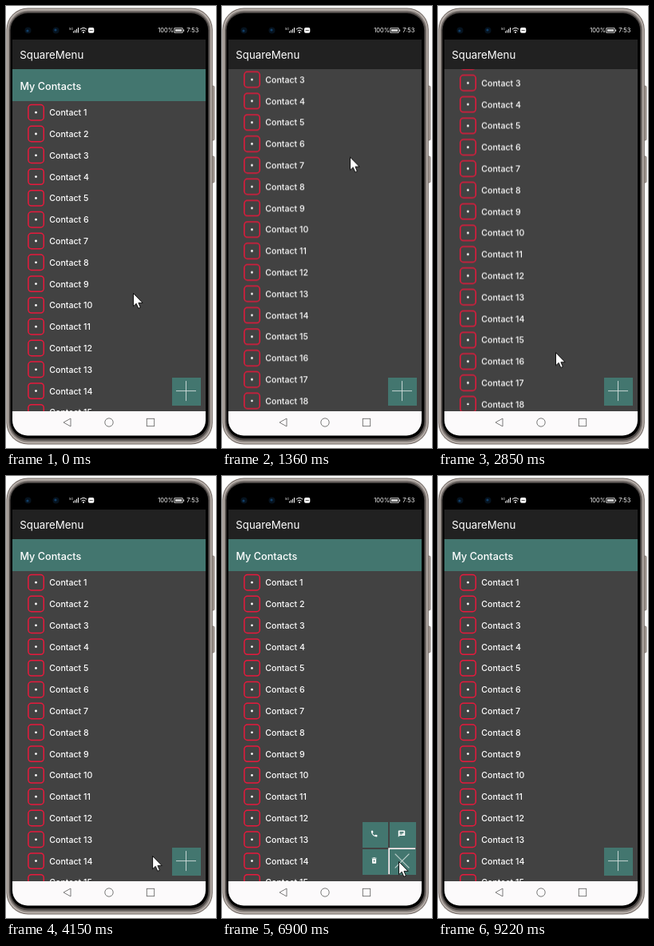
Animation of 263 by 553 pixels, one loop 9870 ms. Source, as an HTML page:

```html
<!DOCTYPE html>
<html lang="en">
<head>
<meta charset="utf-8">
<title>SquareMenu</title>
<style>
  html, body { margin: 0; width: 100%; height: 100%; overflow: hidden; background: #fdfdfd; }
  svg { display: block; width: 263px; height: 553px; }
  text { font-family: Inter, "Open Sans", sans-serif; fill: #fff; }
  .title { font-size: 13.3px; }
  .header { font-size: 12.7px; font-weight: 500; }
  .row text { font-size: 10.6px; font-weight: 500; }
  .row rect { fill: none; stroke: #e8193c; stroke-width: 1.5; }
  .status text { font-size: 7.4px; }
  .nav { fill: none; stroke: #6c6c6c; stroke-width: .9; }

  .cursor, .list, .tile, .plus, .icons { animation: 9870ms linear infinite; }
  .cursor { animation-name: cursor; }
  .list { animation-name: scroll; }
  .icons { animation-name: icons; animation-timing-function: step-end; }
  .plus { animation-name: spin; transform-origin: 225.5px 481.6px; }
  .tile { fill: #43766f; }
  .tl { animation-name: tl; }
  .tr { animation-name: tr; }
  .bl { animation-name: bl; }
  .br { animation-name: br; }

  @keyframes cursor {
    0%, 1.2% { transform: translate(159px, 359px); animation-timing-function: ease-in-out; }
    7.9%, 13.8% { transform: translate(160px, 188.6px); }
    17.73%, 22% { transform: translate(161px, 200px); }
    28.87% { transform: translate(147px, 433px); animation-timing-function: ease-out; }
    31.9%, 33.4% { transform: translate(146.5px, 452px); }
    37.8%, 39.4% { transform: translate(147px, 460px); }
    42.05% { transform: translate(183px, 475px); animation-timing-function: ease-out; }
    47.2%, 58.5% { transform: translate(216px, 482px); }
    68.7%, 69.9% { transform: translate(218px, 482px); }
    69.91%, 83.2% { transform: translate(221px, 482px); animation-timing-function: ease-in; }
    89%, 100% { transform: translate(231px, 558px); }
  }
  @keyframes scroll {
    0%, 4.6% { transform: translateY(0); animation-timing-function: ease-in-out; }
    10.74%, 27.9% { transform: translateY(-94.7px); }
    28.87% { transform: translateY(-91px); }
    31.9%, 100% { transform: translateY(0); }
  }
  @keyframes icons {
    0% { opacity: 0; }
    55.319% { opacity: 1; }
    92.2% { opacity: 0; }
    100% { opacity: 0; }
  }
  @keyframes spin {
    0%, 57% { transform: rotate(0); }
    66%, 83.3% { transform: rotate(45deg); }
    92.2%, 100% { transform: rotate(0); }
  }
  @keyframes tl {
    0%, 57% { transform: translate(208px, 465px) scale(18.3); }
    58.36%, 59% { transform: translate(201px, 457px) scale(14, 15.5); animation-timing-function: ease-out; }
    67%, 84% { transform: translate(176px, 433px) scale(32); animation-timing-function: ease-in; }
    91% { transform: translate(201px, 457px) scale(14, 15.5); }
    92.2%, 100% { transform: translate(208px, 465px) scale(18.3); }
  }
  @keyframes tr {
    0%, 57% { transform: translate(226px, 465px) scale(18, 18.3); }
    58.36%, 59% { transform: translate(227px, 457px) scale(16, 15.5); animation-timing-function: ease-out; }
    67%, 84% { transform: translate(210px, 433px) scale(33, 32); animation-timing-function: ease-in; }
    91% { transform: translate(227px, 457px) scale(16, 15.5); }
    92.2%, 100% { transform: translate(226px, 465px) scale(18, 18.3); }
  }
  @keyframes bl {
    0%, 57% { transform: translate(208px, 482px) scale(18.3, 18); }
    58.36%, 59% { transform: translate(201px, 484px) scale(14, 15); animation-timing-function: ease-out; }
    67%, 84% { transform: translate(176px, 467px) scale(32); animation-timing-function: ease-in; }
    91% { transform: translate(201px, 484px) scale(14, 15); }
    92.2%, 100% { transform: translate(208px, 482px) scale(18.3, 18); }
  }
  @keyframes br {
    0%, 57% { transform: translate(226px, 482px) scale(18); }
    58.36%, 59% { transform: translate(227px, 484px) scale(16, 15); animation-timing-function: ease-out; }
    67%, 84% { transform: translate(210px, 467px) scale(33, 32); animation-timing-function: ease-in; }
    91% { transform: translate(227px, 484px) scale(16, 15); }
    92.2%, 100% { transform: translate(226px, 482px) scale(18); }
  }
</style>
</head>
<body>
<svg viewBox="0 0 263 553">
  <defs>
    <clipPath id="view"><rect x="8" y="79" width="242" height="428"/></clipPath>
    <clipPath id="screen"><rect x="8" y="10" width="242" height="527.5" rx="19"/></clipPath>
  </defs>

  <!-- phone body -->
  <g fill="#a59b95" stroke="#6d645f" stroke-width=".7">
    <rect x="256" y="100" width="5" height="68" rx="1.5"/>
    <rect x="256" y="188" width="5" height="33" rx="1.5"/>
  </g>
  <rect x=".5" y="2.5" width="258.3" height="546" rx="27" fill="#6f6661"/>
  <rect x="1.5" y="3.5" width="256.3" height="544" rx="26" fill="#b9b1ac"/>
  <rect x="3" y="5.5" width="253.3" height="540" rx="24.5" fill="#857e7a"/>
  <rect x="4.3" y="7.3" width="250.5" height="536.2" rx="23" fill="#4b4644"/>
  <rect x="5.6" y="9" width="247.6" height="532" rx="21.5" fill="#000"/>

  <!-- screen -->
  <g clip-path="url(#screen)">
    <rect x="8" y="42" width="242" height="37" fill="#212121"/>
    <rect x="8" y="79" width="242" height="428" fill="#424242"/>
    <rect x="8" y="507" width="242" height="32" fill="#fcfafb"/>
  </g>
  <text class="title" x="17.3" y="66.2">SquareMenu</text>

  <!-- status bar -->
  <g class="status">
    <g fill="#06131f"><circle cx="27.5" cy="30.5" r="4"/><circle cx="62.5" cy="30.5" r="4"/></g>
    <g fill="#123f68"><circle cx="27" cy="31" r="1.6"/><circle cx="62" cy="30" r="1.6"/></g>
    <text x="79" y="29.6" style="font-size:3.8px">5G</text>
    <path d="M84 33.5v-2h1v2zm2 0v-3.3h1v3.3zm2 0v-4.8h1v4.8zm2 0v-6.5h1v6.5z" fill="#fff"/>
    <g fill="none" stroke="#fff" stroke-width="1">
      <path d="M93 29.2q4-3.6 8 0M94.5 31.2q2.5-2.2 5 0"/>
      <path d="M210.8 27.7h10.4v5.6h-10.4z" stroke-width=".8"/>
    </g>
    <circle cx="97" cy="33" r="1" fill="#fff"/>
    <rect x="103" y="27" width="7.3" height="6.8" rx="1.8" fill="#fff"/>
    <path d="M104.5 30.5h4.3" stroke="#555"/>
    <text x="190.3" y="33.3">100%</text>
    <path d="M212 29h8v3h-8zM222 29.4h1.2v2.4H222z" fill="#ccc"/>
    <text x="226.3" y="33.3">7:53</text>
  </g>

  <!-- scrolling contacts -->
  <g clip-path="url(#view)">
    <g class="list" id="list">
      <rect x="8" y="79" width="242" height="40" fill="#43766f"/>
      <text class="header" x="17.4" y="105">My Contacts</text>
    </g>
  </g>

  <!-- navigation bar -->
  <g class="nav">
    <path d="M81 516v10l-9-5z" stroke-linejoin="round"/>
    <circle cx="129" cy="521" r="5.2"/>
    <rect x="176.3" y="516.3" width="9.4" height="9.4"/>
  </g>

  <!-- square menu -->
  <rect x="208.3" y="465.3" width="34" height="33" fill="#f8f3f4"/>
  <rect class="tile tl" width="1" height="1"/>
  <rect class="tile tr" width="1" height="1"/>
  <rect class="tile bl" width="1" height="1"/>
  <rect class="tile br" width="1" height="1"/>
  <path class="plus" d="M213 481.6h25M225.5 469.1v25" stroke="#d3dfdd" stroke-width=".9"/>
  <g class="icons" fill="#fff" fill-rule="evenodd">
    <path transform="translate(190.6 447.6) scale(.42) translate(-12 -12)" d="M6.6 10.8c1.4 2.8 3.8 5.1 6.6 6.6l2.2-2.2c.3-.3.7-.4 1-.2 1.1.4 2.3.6 3.6.6.6 0 1 .4 1 1V20c0 .6-.4 1-1 1C10.6 21 3 13.4 3 4c0-.6.5-1 1-1h3.5c.6 0 1 .4 1 1 0 1.2.2 2.4.6 3.6.1.3 0 .7-.2 1z"/>
    <path transform="translate(225 447.6) scale(.42) translate(-12 -12)" d="M20 2H4a2 2 0 0 0-2 2v18l4-4h14a2 2 0 0 0 2-2V4a2 2 0 0 0-2-2zM6 9h12v2H6zm0-3h12v2H6zm0 6h8v2H6z"/>
    <path transform="translate(190.6 481) scale(.42) translate(-12 -12)" d="M6 19a2 2 0 0 0 2 2h8a2 2 0 0 0 2-2V7H6zM19 4h-3.5l-1-1h-5l-1 1H5v2h14zM11 10h2v3h2l-3 4-3-4h2z"/>
  </g>

  <path class="cursor" d="M.5.5v16.2l3.7-3.4 2.6 6 2.6-1.1-2.5-5.8h5.2z" fill="#fff" stroke="#000" stroke-width=".9"/>
</svg>
<script>
  const list = document.getElementById('list');
  const row = n => {
    const y = 133.2 + 26.8 * (n - 1);
    return `<g class="row" transform="translate(0 ${y.toFixed(1)})">
      <rect x="27.9" y="-9.7" width="19.4" height="19.4" rx="4"/>
      <circle cx="37.5" cy="0" r="1.4" fill="#fff"/>
      <text x="54.3" y="4">Contact ${n}</text></g>`;
  };
  list.insertAdjacentHTML('beforeend', Array.from({ length: 18 }, (_, i) => row(i + 1)).join(''));
</script>
</body>
</html>
```
